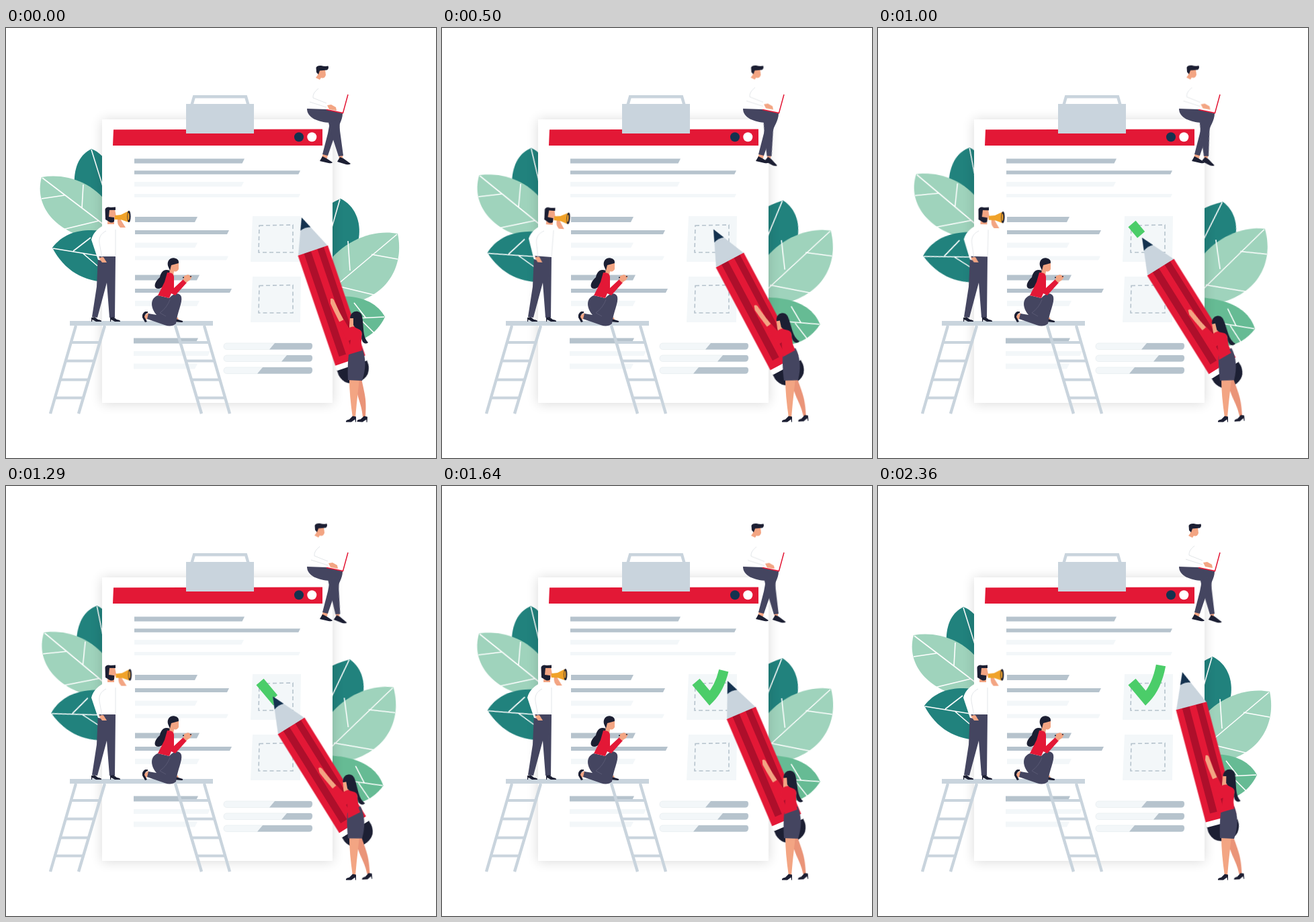
An HTML page for the animation above (2.43 s loop, 640 by 640 pixels).

```html
<!DOCTYPE html>
<html lang="en">
<head>
<meta charset="utf-8">
<title>Checklist</title>
<style>
html, body { margin: 0; width: 100%; height: 100%; overflow: hidden; background: #fff; }
svg { display: block; width: 100%; height: 100%; }

.navy { fill: #1c1f33; }
.pants { fill: #444560; }
.skin { fill: #f3a583; }
.skin2 { fill: #ea9478; }
.red { fill: #e31836; }
.white { fill: #fff; }
.steel { fill: #c9d4dd; }
.dark { fill: #b6c3cd; }
.pale { fill: #f3f7f9; }
.teal { fill: #21827d; }
.mint { fill: #9fd3bc; }
.green { fill: #66bb94; }
.vein { fill: none; stroke: #fff; stroke-width: 1.6; }
.crease { fill: none; stroke: #dfe2e6; stroke-width: .9; }
.frame { fill: none; stroke: #c9d4dd; stroke-width: 4.4; }
.dash { fill: none; stroke: #b6c3cd; stroke-width: 1.6; stroke-dasharray: 6 4; }

.leaf, #pencil, #check, #speaker, #horn, #shin, #sitter, #typing, #hips, #torso, #arm, #leg {
  animation: sway 2430ms linear infinite;
}
#pencil { animation-name: write; }
#check { animation-name: tick; stroke-dasharray: 100 200; }
#speaker { animation-name: shout; transform-origin: 150px 340px; }
#horn { animation-name: horn; }
#shin { animation-name: swing; transform-origin: 492px 132px; }
#sitter { animation-name: nod; }
#typing { animation-name: type; }
#hips { animation-name: hips; transform-origin: 520px 525px; }
#torso { animation-name: lean; transform-origin: 520px 483px; }
#arm { animation-name: reach; transform-origin: 508px 450px; }
#leg { animation-name: step; transform-origin: 525px 524px; }

@keyframes sway {
  0%, 97.06%, to { transform: rotate(0deg); }
  11.76% { transform: rotate(calc(var(--a) * .37)); }
  29.41% { transform: rotate(calc(var(--a) * .87)); }
  41.18% { transform: rotate(var(--a)); }
  52.94% { transform: rotate(calc(var(--a) * .9)); }
  67.65% { transform: rotate(calc(var(--a) * .56)); }
  79.41% { transform: rotate(calc(var(--a) * .3)); }
}
@keyframes write {
  0% { transform: translate(440px, 282px) rotate(-18.8deg); }
  11.76% { transform: translate(419px, 288px) rotate(-23.7deg); }
  29.41% { transform: translate(389px, 311px) rotate(-32.2deg); }
  52.94% { transform: translate(397px, 313px) rotate(-31.9deg); }
  67.65% { transform: translate(425px, 290px) rotate(-23deg); }
  79.41%, to { transform: translate(453px, 277px) rotate(-14.8deg); }
}
@keyframes tick {
  0%, 26.47% { stroke-dashoffset: 100; }
  29.41% { stroke-dashoffset: 88; }
  52.94% { stroke-dashoffset: 63; }
  67.65% { stroke-dashoffset: 9; }
  73.53%, to { stroke-dashoffset: 0; }
}
@keyframes shout {
  0%, 52.94%, to { transform: rotate(0deg); }
  11.76% { transform: rotate(5.6deg); }
  29.41% { transform: rotate(3.3deg); }
}
@keyframes horn {
  0%, 11.76% { transform: translate(0, 0); }
  29.41% { transform: translate(1px, 0); }
  52.94% { transform: translate(1.5px, .5px); }
  67.65%, 79.41% { transform: translate(.7px, 0); }
  97.06%, to { transform: translate(1.7px, .5px); }
}
@keyframes swing {
  0% { transform: rotate(0deg); }
  11.76% { transform: rotate(7.4deg); }
  29.41% { transform: rotate(15deg); }
  52.94% { transform: rotate(4.5deg); }
  67.65% { transform: rotate(1deg); }
  79.41% { transform: rotate(2deg); }
  97.06%, to { transform: rotate(1deg); }
}
@keyframes nod {
  0%, 79.41% { transform: translate(0, 0); }
  11.76%, 67.65% { transform: translate(-1px, -.2px); }
  29.41%, 52.94% { transform: translate(-2px, -.4px); }
  97.06%, to { transform: translate(1px, 0); }
}
@keyframes type {
  0% { transform: translate(0, 0); }
  11.76% { transform: translate(-1px, 0); }
  29.41% { transform: translate(3px, -3px); }
  52.94% { transform: translate(2px, 0); }
  67.65% { transform: translate(3px, .5px); }
  79.41% { transform: translate(9px, -1px); }
  97.06%, to { transform: translate(6px, -1px); }
}
@keyframes hips {
  0% { transform: rotate(0deg); }
  11.76%, 52.94% { transform: rotate(-3deg); }
  29.41% { transform: rotate(-6deg); }
  67.65% { transform: rotate(-1deg); }
  79.41%, to { transform: rotate(.3deg); }
}
@keyframes lean {
  0% { transform: rotate(0deg); }
  11.76% { transform: translate(0, -1px) rotate(-4.5deg); }
  29.41% { transform: translate(-1px, 4px) rotate(-10.5deg); }
  52.94% { transform: translate(0, 7px) rotate(-7deg); }
  67.65% { transform: translate(0, 2px) rotate(-2.5deg); }
  79.41%, to { transform: rotate(1deg); }
}
@keyframes reach {
  0% { transform: rotate(0deg); }
  29.41% { transform: rotate(2deg); }
  52.94% { transform: rotate(-4deg); }
  67.65% { transform: rotate(-1deg); }
  79.41%, to { transform: rotate(3deg); }
}
@keyframes step {
  0% { transform: rotate(0deg); }
  11.76% { transform: rotate(-6.5deg); }
  29.41% { transform: rotate(-8deg); }
  52.94%, to { transform: rotate(-7deg); }
}
</style>
</head>
<body>
<svg viewBox="0 0 640 640">
  <defs>
    <filter id="blur" x="-10%" y="-10%" width="120%" height="120%"><feGaussianBlur stdDeviation="9"/></filter>
    <path id="shoe" d="M0 8 Q-1 5 5 4 L10 -1 L15 0 L15 8 L14 8 L13.5 4 L8 8Z"/>
    <g id="ladder" class="frame">
      <path d="M104 443 L66 574 M147 443 L108 574"/>
      <path stroke-width="4" d="M97 468 H140 M89 495.5 H132 M81 523.5 H124 M73 550.5 H116"/>
    </g>
  </defs>

  <!-- leaves -->
  <g class="leaf" style="--a:6.5deg; transform-origin:150px 262px">
    <path class="teal" d="M127 180 C107 190 98 212 103 250 L165 262 C165 220 150 188 127 180Z"/>
    <path class="vein" d="M127 181 L147 245"/>
  </g>
  <g class="leaf" style="--a:2.8deg; transform-origin:150px 300px">
    <path class="mint" d="M53 222 C88 216 127 228 152 262 L152 316 C82 314 40 270 53 222Z"/>
    <path class="vein" d="M54 223 L146 293 M87 249 L53 254 M113 268 L115 233 M138 287 L80 301"/>
  </g>
  <g class="leaf" style="--a:-8.5deg; transform-origin:150px 345px">
    <path class="teal" d="M69 327 C88 302 118 297 155 304 L155 378 C118 379 87 362 69 327Z"/>
    <path class="vein" d="M70 328 L150 341 M100 332 L126 312 M114 335 L136 354"/>
  </g>
  <g class="leaf" style="--a:10.5deg; transform-origin:480px 340px">
    <path class="teal" d="M498 254 C519 264 529 288 525 313 L500 350 L468 350 V272 Q480 262 498 254Z"/>
    <path class="vein" d="M497 255 L480 314"/>
  </g>
  <g class="leaf" style="--a:-4.2deg; transform-origin:480px 400px">
    <path class="mint" d="M583 306 C548 299 503 315 476 353 V414 C564 414 594 358 583 306Z"/>
    <path class="vein" d="M582 307 L480 393 M544 337 L583 344 M512 361 L509 317 M489 383 L551 398"/>
  </g>
  <g class="leaf" style="--a:12deg; transform-origin:478px 425px">
    <path class="green" d="M564 430 C552 408 525 394 476 401 V470 C522 473 550 460 564 430Z"/>
    <path class="vein" d="M563 430 L480 434 M536 432 L518 409 M527 433 L548 454"/>
  </g>

  <!-- clipboard -->
  <rect x="143" y="137" width="343" height="422" opacity=".15" filter="url(#blur)"/>
  <rect class="white" x="143" y="136" width="343" height="422"/>
  <path class="red" d="M160 151.300 L471 150.500 V175 H159Z"/>
  <circle cx="436" cy="162.300" r="7" fill="#14324f"/>
  <circle cx="455.300" cy="162.300" r="7" class="white"/>
  <path class="frame" d="M276 116 L280 102.200 H357 L361 116"/>
  <rect class="steel" x="268" y="113" width="101" height="44"/>
  <g id="lines"></g>
  <path class="pale" d="M367 280 H439 L438 348 H364Z M367 370 H439 L438 438 H364Z"/>
  <path class="dash" d="M377 294 L427 293 V334 H376Z"/>
  <path class="dash" d="M377 383.500 L427 382.500 V424 H376Z"/>
  <g id="bars"></g>
  <path id="check" pathLength="100" d="M378 291.500 L398.500 316 Q415 299 421 267" fill="none" stroke="#4bcd69" stroke-width="14.500"/>

  <!-- scaffold -->
  <use href="#ladder"/>
  <use href="#ladder" transform="matrix(-1 0 0 1 399 0)"/>
  <rect class="steel" x="95" y="436" width="213" height="7"/>

  <!-- man with megaphone -->
  <path class="pants" d="M137 339 H163 L162 431 H154 L150 379 L136 431 L128 430 L135 385Z"/>
  <use href="#shoe" class="navy" transform="matrix(-1 0 0 .75 142 431)"/>
  <use href="#shoe" class="navy" transform="matrix(-1 0 0 .75 170 431)"/>
  <g id="speaker">
    <path class="white" d="M150 292 H160 L170 297 L163 306 V340 H138 L142 346 L137 345 L127 315 C130 304 138 296 150 292Z"/>
    <path class="crease" d="M149 302 C141 306 138 312 139 320 L143 342 M163 300 V339"/>
    <path class="skin" d="M138 342 L145 341 L150 349 L143 349Z"/>
    <path class="skin" d="M152 270 H162 L164 280 L161 287 V292 H151Z"/>
    <path class="navy" d="M148 285 L147.500 270 Q149 265 156 267 L163 266.500 V271 H154 L153 281 L161 282 V288 Q157 291 153 288Z"/>
    <g id="horn">
      <path class="skin" d="M166 285 L170 284 L173 289 L178 297 L170 297 Q165 292 166 285Z"/>
      <path fill="#f0a229" d="M162 279 L171 278 L182 272.500 V289 L172 285.500 L162 285Z"/>
      <ellipse class="navy" cx="183" cy="280.500" rx="2.600" ry="8.800"/>
      <ellipse cx="182.300" cy="280.500" rx="1.200" ry="5.500" fill="#f0a229"/>
    </g>
  </g>

  <!-- kneeling woman -->
  <g>
    <path class="skin" d="M204 429 L212 424 L215 430 L207 435Z M252 431 L256 431 L257 435 L252 436Z"/>
    <path class="navy" d="M211 422 L207 422 Q202 425 203 431 L207 438 L210 437 L206 430 Q207 425 211 424Z M250 437 V432 L263 436 Q264 438 261 438Z"/>
    <path class="pants" d="M226 398 L243 402 C250 394 258 393 261 400 C263 409 255 422 253 440 Q246 446 236 442 L210 433 L212 425 L224 427 C214 415 215 402 226 398Z"/>
    <path d="M244 404 Q240 416 229 424 L238 429" fill="none" stroke="#5d5e78" stroke-width=".8"/>
    <path class="navy" d="M244 361 C234 357 230 365 229 371 C224 375 219 383 223 387 C229 390 235 386 238 376 L247 368Z"/>
    <path class="skin" d="M245 350 H257 V359 Q254 364 250 362 L249 369 L243 366Z"/>
    <path class="navy" d="M241 354 C239 345 246 341 251 342.500 Q258 344 257 350 L246 353 L244 361Z"/>
    <path class="red" d="M240 364 Q249 363 250 370 L250 387 L264 374 L269 379 L252 398 L246 395 L243 402 L226 398 L236 378Z"/>
    <path class="skin" d="M264 375 L265 369 L271 367 L277 370 L274 375 L268 379Z"/>
    <path d="M263 371.500 L277 369.500" stroke="#1c1f33" stroke-width="1.400" stroke-dasharray="2 9"/>
  </g>

  <!-- man with laptop -->
  <g>
    <path class="skin" d="M472 187 L479 189 L478 194 L470 193Z"/>
    <path class="pants" d="M448 120 L476 121 L501 127 C501 138 494 146 490 158 L479 190 L471 188 L479 157 L482 141 C465 140 448 134 448 120Z"/>
    <path class="navy" d="M471 191 L477 194 L486 200 Q485 202 480 201 L467 198Z"/>
    <g id="shin">
      <path class="skin" d="M495 188 L501 188 L501 195 L496 195Z"/>
      <path class="pants" d="M480 141 L498 134 Q496 142 497 153 L502 190 L495 191 L486 163Z"/>
      <path class="navy" d="M497 192 L502 194 L513 202 Q511 204 506 203 L493 199Z"/>
    </g>
    <g id="sitter">
      <path class="white" d="M460 80 L472 83 L479 110 V120 H449Z"/>
      <path class="skin" d="M465 62 H475 L476 70 Q474 76 469 74 L467 77 L461 74 L464 70Z"/>
      <path class="navy" d="M462 66 L461.500 59 Q463 55.500 469 56 Q475 57.500 479.500 56.500 Q481 60 478 62.500 L467 63.500 L465 69Z"/>
    </g>
    <g id="typing">
      <path class="crease" d="M465 90 Q456 97 457 104 L477 112 M452 110 L477 118"/>
      <path class="skin" d="M478 115 L484 114 L491 118 L492 123 L481 121Z"/>
    </g>
    <path d="M477 121.500 L501.500 126.500 L509 99" fill="none" stroke="#e31836" stroke-width="1.500"/>
  </g>

  <!-- pencil, tip at its own zero point -->
  <g id="pencil">
    <path class="navy" d="M-23.500 232 H23.500 V240 Q20 259 0 259 Q-20 259 -23.500 240Z"/>
    <rect class="white" x="-23.500" y="224" width="47" height="9"/>
    <path class="steel" d="M0 0 L23.500 53 H-23.500Z"/>
    <path fill="#14324f" d="M0 0 L8 18 Q0 15 -8 18Z"/>
    <rect class="red" x="-23.500" y="52" width="47" height="173"/>
    <path fill="#ae0f2b" d="M-14 52 H-3 V214 H-14Z M7 52 H17 V214 H7Z"/>
  </g>

  <!-- woman with pencil -->
  <g>
    <g id="leg">
      <path class="skin2" d="M520 522 H529 C534 546 537 552 535 579 H531 C529 556 521 550 520 522Z"/>
      <use href="#shoe" class="navy" transform="translate(523 578) rotate(3)"/>
    </g>
    <path class="skin" d="M511 522 H526 L522 558 L520 580 H516 Q511 546 511 522Z"/>
    <use href="#shoe" class="navy" transform="translate(506 578.500)"/>
    <g id="hips">
      <path class="pants" d="M510 486 L530 477 Q539 498 530 525 L509 524 Q508 503 510 486Z"/>
      <g id="torso">
        <g id="arm">
          <path class="skin" d="M483 403 Q487 401 489 407 L497 424 L504 437 L498 441 L488 421 L483 410Z"/>
          <path class="red" d="M495 438 L503 434 L510 446 L516 462 L508 467Z"/>
        </g>
        <path class="skin" d="M512 430 H520 V447 H511 L511 443Z"/>
        <path class="red" d="M508 447 Q518 442 529 445 C532 458 526 470 530 480 L510 486 L513 464 L507 466Z"/>
        <path class="navy" d="M512 432 C513 419 528 419 530 429 C533 444 530 459 539 468 C535 472 527 468 530 456 C530 446 521 450 517 442 L517 432Z"/>
      </g>
    </g>
  </g>
</svg>
<script>
const paint = (id, html) => { document.getElementById(id).innerHTML = html; };

// left, right, top, height, tone
const rows = [
  [191, 355, 194.5, 7, 'dark'], [191, 438, 212.3, 5.5, 'dark'],
  [191, 354, 229, 7, 'pale'], [191, 438, 247, 5, 'pale'],
  [192, 285, 281, 8, 'dark'], [192, 332, 301, 6, 'dark'],
  [192, 285, 319.5, 7.5, 'pale'], [192, 331, 339.5, 6, 'pale'],
  [192, 288, 367.5, 8, 'dark'], [192, 336, 388, 6, 'dark'],
  [192, 288, 406, 8, 'pale'], [190, 286, 461.5, 8, 'dark'],
  [190, 304, 481, 7, 'pale'], [190, 285, 499.5, 8, 'pale']
];
paint('lines', rows.map(([l, r, y, h, tone]) =>
  `<path class="${tone}" d="M${l} ${y} H${r} L${r - h / 2} ${y + h} H${l}Z"/>`).join(''));

const bars = [[469, 400], [487, 418], [505, 382]];
paint('bars', bars.map(([y, x]) =>
  `<rect x="324" y="${y}" width="132" height="9.5" rx="4.500" fill="#f3f7f9" stroke="#e3e9ed" stroke-width=".6"/>
   <path class="dark" d="M${x} ${y} H453 Q456 ${y} 456 ${y + 4} Q456 ${y + 9.5} 451 ${y + 9.5} H${x - 8}Z"/>`).join(''));

// Play the keyframes on a fixed beat
const LOOP = 2430, BEATS = 34, start = performance.now();
const moves = document.getAnimations();
moves.forEach(m => m.pause());

function draw() {
  const t = (performance.now() - start) % LOOP;
  const beat = Math.min(BEATS - 1, Math.floor((t + 6) * BEATS / LOOP));
  moves.forEach(m => { m.currentTime = beat * LOOP / BEATS; });
  requestAnimationFrame(draw);
}
draw();
</script>
</body>
</html>
```
